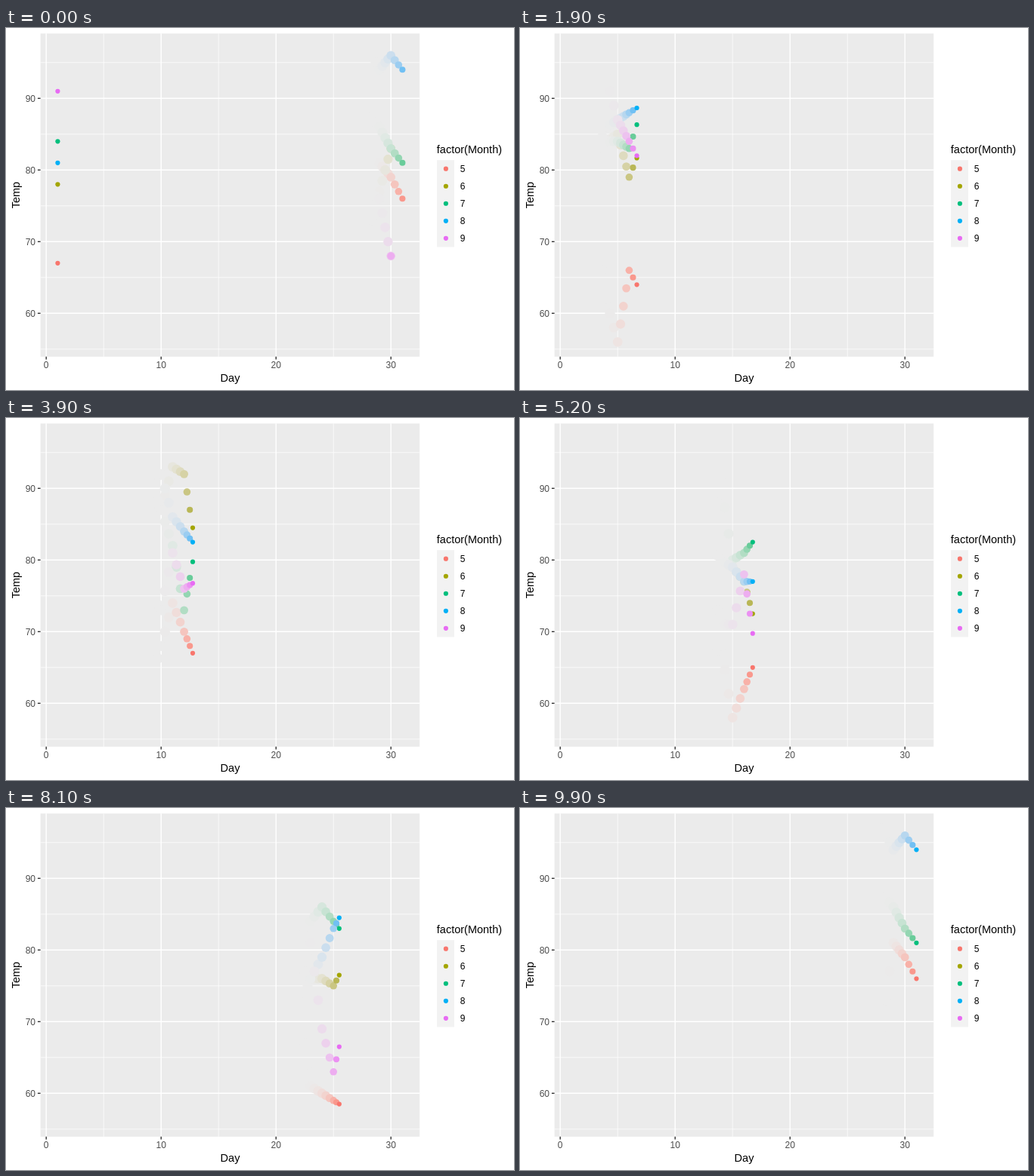
These frames come from a looping animation (672 by 480 pixels, 10000 ms). An HTML page:

```html
<!DOCTYPE html>
<html lang="en">
<head>
<meta charset="utf-8">
<title>Temperature by day</title>
<style>
  html, body { margin: 0; width: 100%; height: 100%; overflow: hidden; background: #fff; }
  svg { display: block; font: 12px "Liberation Sans", Arial, sans-serif; }
  .title { font-size: 14.5px; }
  .axis { fill: #4d4d4d; }
</style>
</head>
<body>
<svg width="672" height="480" viewBox="0 0 672 480">
  <g id="plot"></g>
  <g id="points"></g>
</svg>
<script>
const FRAMES = 100, STEP = 100, WAKE = 10;
const R_NEW = 3.08, R_OLD = 6.63;
const GREY = '#ebebeb';

const x = day => 53.2 + 15.2 * day;
const y = temp => 93.3 + 9.5 * (90 - temp);
const left = x(-0.5), right = x(32.5), ceiling = y(99.05), floor = y(53.95);

// Turning points of a month by day; the empty days lie on straight runs between them.
function fillRuns(turns) {
  let from = 0;
  return Array.from(turns, (temp, day) => {
    if (day in turns) return turns[from = day];
    let to = day;
    while (!(to in turns)) to++;
    return Math.round(turns[from] + (turns[to] - turns[from]) * (day - from) / (to - from));
  });
}

const months = [];
const month = (color, turns) => months.push({ color, temps: fillRuns(turns) });

month('#f8766d', [67,, 74, 62, 56, 66,, 59, 61,, 74,, 66, 68, 58,, 66, 57, 68,, 59, 73, 61,,,, 57,, 81,, 76]);
month('#a3a500', [78,, 67, 84, 85, 79,,, 90, 87, 93, 92, 82,,, 77,, 65, 73,, 77,,,, 75, 78, 73, 80, 77, 83]);
month('#00bf7d', [84,, 81, 84,, 83,, 92, 92,, 82, 73,, 91, 80,,, 84, 87, 85, 74, 81,, 86,, 82,, 88,,, 81]);
month('#00b0f6', [81,, 82, 86,,,,,, 92, 86,, 82,,, 77,,,,, 77, 72,,,, 86, 88, 97, 94, 96, 94]);
month('#e76bf3', [91,,, 93, 87,,,,, 73, 81, 76, 77, 71, 71, 78, 67, 76, 68, 82, 64,, 81, 69, 63,, 77,, 76, 68]);

const line = (x1, y1, x2, y2, color, width) =>
  `<line x1="${x1}" y1="${y1}" x2="${x2}" y2="${y2}" stroke="${color}" stroke-width="${width}"/>`;
const rect = (px, py, w, h, color) =>
  `<rect x="${px}" y="${py}" width="${w}" height="${h}" fill="${color}"/>`;
const text = (px, py, str, anchor, cls = '', turn = 0) =>
  `<text transform="translate(${px} ${py}) rotate(${turn})" text-anchor="${anchor}" class="${cls}">${str}</text>`;
const dot = (px, py, r, color) =>
  `<circle cx="${px}" cy="${py}" r="${r}" style="fill:${color}"/>`;

function drawPlot() {
  const column = (day, width) => line(x(day), ceiling, x(day), floor, '#fff', width);
  const row = (temp, width) => line(left, y(temp), right, y(temp), '#fff', width);
  let s = rect(left, ceiling, right - left, floor - ceiling, GREY);
  for (let temp = 55; temp < 100; temp += 10) s += row(temp, 0.71);
  for (let day = 5; day < 30; day += 10) s += column(day, 0.71);
  for (let temp = 60; temp < 100; temp += 10) {
    s += row(temp, 1.42) + line(left - 3.67, y(temp), left, y(temp), '#333', 1.42)
      + text(39, y(temp) + 4.3, temp, 'end', 'axis');
  }
  for (let day = 0; day <= 30; day += 10) {
    s += column(day, 1.42) + line(x(day), floor, x(day), floor + 3.67, '#333', 1.42)
      + text(x(day), 451, day, 'middle', 'axis');
  }
  s += text(296.5, 469, 'Day', 'middle', 'title')
    + text(17.9, 221.6, 'Temp', 'middle', 'title', -90)
    + text(569.8, 166, 'factor(Month)', 'start', 'title')
    + rect(570, 175.2, 23.04, 115.2, '#f2f2f2');
  months.forEach(({ color }, i) => {
    const cy = 186.7 + 23.04 * i;
    s += dot(581.9, cy, R_NEW, color) + text(600.7, cy + 4.3, i + 5, 'start');
  });
  plot.innerHTML = s;
}

// Frame on which a whole day is reached; exact halves round to the odd frame.
function dayFrame(day) {
  const exact = (day - 1) * (FRAMES - 1) / 30;
  return exact % 1 === 0.5 ? Math.floor(exact) | 1 : Math.round(exact);
}

// Day and temperature on a frame, or null once the month is over.
function locate(temps, frame) {
  const last = temps.length;
  if (frame >= dayFrame(last + 1)) return null;
  let day = 1;
  while (day < last && dayFrame(day + 1) <= frame) day++;
  if (day === last) return [day, temps[day - 1]];
  const f = (frame - dayFrame(day)) / (dayFrame(day + 1) - dayFrame(day));
  return [day + f, temps[day - 1] + f * (temps[day] - temps[day - 1])];
}

// Each point leaves a wake that grows and fades into the panel.
function drawPoints(frame) {
  let s = '';
  for (const { color, temps } of months) {
    if (!locate(temps, frame)) continue;
    for (let age = WAKE; age >= 0; age--) {
      const at = locate(temps, (frame - age + FRAMES) % FRAMES);
      if (!at) continue;
      const p = (1 - age / WAKE) ** 3;
      const fill = `color-mix(in lab, ${color} ${100 * p}%, ${GREY})`;
      s += dot(x(at[0]), y(at[1]), R_OLD + (R_NEW - R_OLD) * p, fill);
    }
  }
  points.innerHTML = s;
}

const plot = document.getElementById('plot');
const points = document.getElementById('points');
let shown = -1;

function tick() {
  const frame = Math.floor(performance.now() / STEP) % FRAMES;
  if (frame !== shown) drawPoints(shown = frame);
  requestAnimationFrame(tick);
}

drawPlot();
tick();
</script>
</body>
</html>
```
